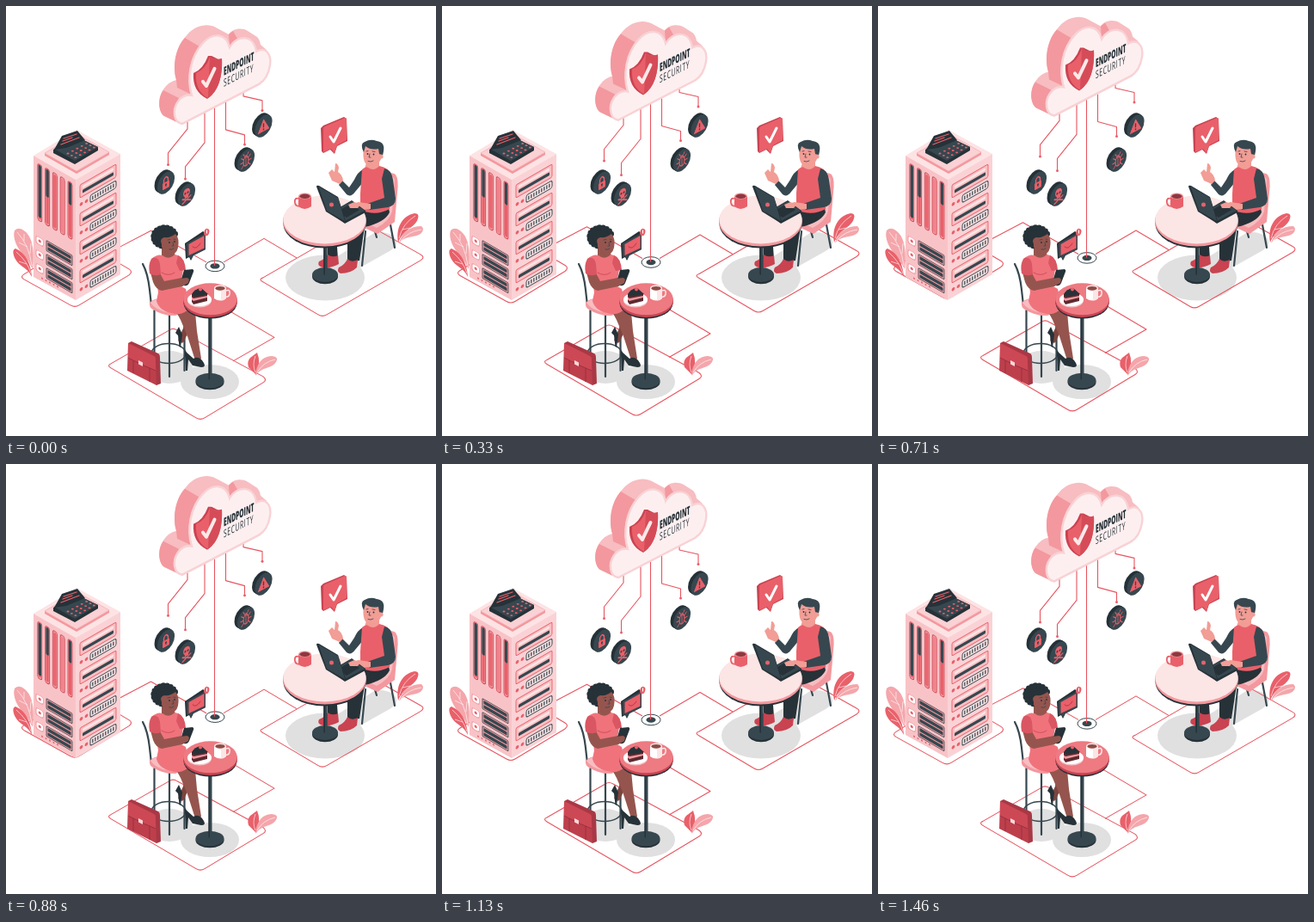
An HTML page for the animation above (1500 ms loop, 500 by 500 pixels).

```html
<!DOCTYPE html>
<html lang="en">
<head>
<meta charset="utf-8">
<title>Endpoint security</title>
<style>
html, body { margin: 0; width: 100%; height: 100%; overflow: hidden; background: #fff; }
svg { display: block; width: 100vw; height: 100vh; }
.line { fill: none; stroke: #e85560; stroke-width: 1.1; stroke-linejoin: round; }
.thin { fill: none; stroke: #37474f; stroke-width: .8; stroke-linecap: round; }
.leg { fill: none; stroke: #37474f; stroke-width: 2.2; stroke-linecap: round; stroke-linejoin: round; }
.limb { fill: none; stroke-linecap: round; stroke-linejoin: round; }
.dk { fill: #37474f; } .bk { fill: #263238; }
.red { fill: #e9606a; } .deep { fill: #c94351; } .rose { fill: #f3989e; }
.leaf { fill: #f4a6ab; } .pink { fill: #f7bdc1; } .pale { fill: #fce5e5; }
.dress { fill: #f0737c; }
.skin { fill: #f29d95; } .brown { fill: #95554e; }
.shade { fill: #e0e0e0; }
.vein { fill: none; stroke: #fff; stroke-width: .8; opacity: .75; }
text { font-family: "Open Sans", sans-serif; fill: #263238; }
</style>
</head>
<body>
<svg viewBox="0 0 500 500" xmlns="http://www.w3.org/2000/svg">
<g class="shade">
  <ellipse cx="371" cy="316" rx="46" ry="26.5"/>
  <path d="M384 292 L428 264 Q440 261 451 268 Q459 277 446 285 L412 304Z"/>
  <ellipse cx="190" cy="420" rx="27" ry="19"/>
  <ellipse cx="237" cy="437" rx="34" ry="20"/>
</g>

<g id="float">
  <g class="line">
    <path d="M34 303 L21 311 Q16 314 21 317 L75 347 Q80 350 85 347 L143 312 Q148 308 143 305 L126 295"/>
    <path d="M131 280 L168.500 260.300 L233 297"/>
    <path d="M253 297 L300 269.500 L338 292"/>
    <path d="M299 315 L408 252 Q413 249 418 252 L482 288 Q488 291 482 295 L373 358 Q368 361 363 358 L299 320 Q293 317 299 315Z"/>
    <path d="M240 342 L312 384.500 L264 412"/>
    <path d="M122 415 L190 376 Q194 373 199 376 L299 430 Q304 434 299 437 L231 478 Q226 481 221 478 L122 420 Q117 417 122 415Z"/>
    <path d="M211 126V142L188.500 170V183"/>
    <path d="M231 118V158L208.500 186V200"/>
    <path d="M255.500 102V143L277.500 149V160"/>
    <path d="M276 90V104L298 109V121"/>
  </g>
  <g class="red">
    <circle cx="188.500" cy="183.500" r="1.500"/><circle cx="208.500" cy="200" r="1.500"/>
    <circle cx="277.500" cy="160" r="1.500"/><circle cx="298" cy="120.500" r="1.500"/>
  </g>
  <ellipse cx="243" cy="301.500" rx="11" ry="6.300" fill="#fff" stroke="#37474f"/>
  <ellipse class="dk" cx="243" cy="301.500" rx="5.500" ry="3.200"/>
  <path class="line" d="M242.500 110V301"/>

  <path class="pink" d="M205 137 L184 127 C177 122 176 106 183 96 Q189 87 198 85 C193 67 198 46 211 32 C221 21 235 19 244 24 L259 32 C264 25 274 24 281 28 L292 35 Q295 38 296 44 L303 50 L296 90Z"/>
  <path class="rose" d="M205 137 L184 127 C177 122 176 106 183 97 L201 106 Q193 122 205 137Z M198 85 C193 67 198 46 208 36 L225 46 C213 60 210 84 216 102 L199 94Z M259 32 L264 28 L269 37 L260 46Z"/>
  <path fill="#fdeff0" stroke="#f9d2d5" stroke-width="2.400" d="M205 136 C195 135 193 120 200 110 Q207 101 216 103 C210 84 214 58 229 42 C241 29 256 31 260 47 C268 33 288 31 291 52 C302 46 309 55 307 68 C305 80 301 86 294 90Z"/>
  <path class="deep" d="M218 77 Q229 73 235 57 L239 57 L249 62 L240 102 L234 107 C222 101 217 91 218 77Z"/>
  <path class="red" d="M221 77 Q232 73 237 58 Q243 63 251 60 C252 81 247 98 235 106 C225 101 220 91 221 77Z"/>
  <path fill="#d54c58" d="M237 58 Q243 63 251 60 C252 81 247 98 235 106Z"/>
  <path class="limb" d="M229 87L233 92L242.500 72" stroke="#fce9e9" stroke-width="4"/>
  <text transform="matrix(.49 -.25 0 1 253 80)" font-size="13.600" font-weight="800">ENDPOINT</text>
  <text transform="matrix(.54 -.275 0 1 253 93)" font-size="12.400" letter-spacing="1.200">SECURITY</text>
</g>

<!-- leaves -->
<g>
  <path class="leaf" d="M31 306 C33 288 32 270 22 262 Q15 256 10 261 C7 269 13 282 20 289 Q27 297 31 306Z"/>
  <path class="vein" d="M30 302Q27 278 13 263M28 288L29 276M25 280L15 275M21 273L21 265"/>
  <path class="red" d="M30 315 C29 300 23 287 11 282 Q7 283 9 290 C13 303 25 303 30 315Z"/>
  <path class="vein" d="M29 311Q25 297 12 286M24 300L15 297"/>
  <path class="red" d="M456 275 C453 257 461 244 475 241 Q481 241 479 247 C476 258 462 259 456 275Z"/>
  <path class="vein" d="M457 270Q461 253 476 244M461 260L470 258"/>
  <path class="leaf" d="M457 276 C460 263 470 256 483 256 Q487 259 483 264 C477 270 464 266 457 276Z"/>
  <path class="vein" d="M459 273Q468 262 483 260"/>
  <path class="red" d="M291 429 L282 420 Q280 413 284 409 L292 403 Q297 415 291 429Z"/>
  <path class="vein" d="M290 426Q286 417 290 407"/>
  <path class="leaf" d="M290 430 C291 416 298 407 309 407 Q318 408 314 414 C308 423 299 418 290 430Z"/>
  <path class="vein" d="M292 426Q299 414 313 411"/>
</g>

<!-- server -->
<g>
  <path fill="#fde3e4" d="M32 174L82 144L133 172L81 202Z"/>
  <path fill="#f8c3c7" d="M32 174L81 202V342L32 315Z"/>
  <path fill="#fad2d5" d="M81 202L133 172V312L81 342Z"/>
  <path class="rose" d="M45 171L82 192L120 170V173L82 195L45 174Z"/>
  <path fill="#fad1d4" stroke="#f3a3a9" stroke-width=".6" d="M45 171L83 149L120 170L82 192Z"/>
  <path class="bk" d="M55 167L82 152L107 164V168L80 184L55 171Z"/>
  <path class="dk" d="M56 166L82 152L107 164L80 180Z"/>
  <path class="bk" d="M56 167L65 151L83 145L92 156L70 165Z"/>
  <path class="limb" d="M67 154L82 149M66 157L77 153M64 161L85 153" stroke="#e9606a" stroke-width="1.300"/>
  <g id="keys" class="red"></g>
  <g id="left" transform="matrix(1 .575 0 1 32 174)"></g>
  <g id="right" transform="matrix(1 -.577 0 1 81 202)"></g>
</g>

<!-- threat coins -->
<g id="coins"></g>

<!-- man -->
<g>
  <path class="leg" d="M418 262L414 302M429 262L431 269M446 249L452 281"/>
  <path class="rose" d="M440 200 Q447 191 453 196 Q457 202 455 217 L452 251 L432 265 L417 258 L437 243Z"/>
  <path class="pink" d="M443 202Q449 195 452 202L449 239Q446 250 431 258L420 253L438 242Z"/>
  <path class="bk" d="M444 230 L446 240 Q440 252 417 257 L411 296 L397 298 L397 265 L385 280 L386 294 L374 293 L374 263 Q385 245 414 236Z"/>
  <path class="deep" d="M374 289Q379 293 386 290L387 300Q379 305 368 304Q361 302 364 297Q371 294 374 289Z"/>
  <path class="deep" d="M397 294Q402 299 409 295L408 304Q401 311 389 311Q384 309 387 304Q394 301 397 294Z"/>
  <ellipse class="bk" cx="371" cy="314.500" rx="15" ry="8.800"/>
  <ellipse class="dk" cx="371" cy="312.500" rx="15" ry="8.500"/>
  <path class="dk" d="M369.300 278H373.700V312Q371.500 314 369.300 312Z"/>
  <path class="bk" d="M369.300 278H371V313L369.300 312Z"/>
  <ellipse class="bk" cx="370.500" cy="253" rx="48" ry="28.500"/>
  <ellipse class="rose" cx="370.500" cy="250.500" rx="48.500" ry="29"/>
  <ellipse class="pale" cx="370.500" cy="248.500" rx="48" ry="28"/>

  <path class="skin" d="M420 179L434 177L434 189Q426 196 417 189Z"/>
  <path class="dk limb" d="M415 190 Q409 193 405 202 L399 211 L391 203 L387 208 L396 219 Q401 223 406 216 L416 204Z"/>
  <path class="red" d="M414 190 Q419 186 421 188 Q428 193 434 186 Q444 188 448 195 L446 236 Q430 245 412 237 L412 218Z"/>
  <path class="dk" d="M440 189 Q448 190 450 202 L453 224 Q453 232 444 234 L423 237 L420 230 L440 223 L437 201Z"/>
  <path class="skin" d="M424 230L410 228L398 231L402 235L414 237L424 236Z"/>
  <path class="skin" d="M388 207 L379 203 L375 194 L379 190 L382 193 L383 183 Q386 183 387 188 L386 193 Q391 196 392 203Z"/>
  <path class="skin" d="M416 165 C414 178 417 186 424 186 Q433 186 436 178 L438 165 L432 161 H418Z"/>
  <path class="dk" d="M416 170 Q411 160 417 158 Q424 154 431 157 Q441 158 439 169 L438 174 L434 172 L433 166 Q424 168 418 163Z"/>
  <circle class="skin" cx="436" cy="175" r="2.600"/>
  <circle class="bk" cx="420.500" cy="172" r=".9"/><circle class="bk" cx="427.500" cy="172.500" r=".9"/>
  <path class="thin" d="M423 172L422 176L424 176M421 180.500Q424 182 427 180M419 169L421 168.500M426 169L429 169.500"/>

  <path class="bk" d="M378 240L402 226L418 238V240L394 253Z"/>
  <path class="dk" d="M380 239L402 227L417 238L394 250Z"/>
  <path class="bk" d="M385 239L401 230L411 237L396 246Z"/>
  <path class="bk" d="M361 210 Q361 208 364 209 L386 222 L395 250 L393 252 L372 239Z"/>
  <path class="dk" d="M363.500 210L386 223L394 250L373 238Z"/>
  <circle class="red" cx="378.500" cy="231" r="2.500"/>
  <path class="skin" d="M398 231L405 228L412 231L409 235L400 235Z"/>
  <path d="M341 224Q335 222 336 229Q337 234 343 232" fill="none" stroke="#e9606a" stroke-width="1.800"/>
  <path class="red" d="M340 221V233Q347 239 355 233V221Z"/>
  <ellipse class="rose" cx="347.500" cy="221" rx="7.500" ry="3.600"/><ellipse fill="#8c3840" cx="347.500" cy="221.300" rx="6" ry="2.700"/>
  <path class="deep" d="M366 142L369 139L393 129L396 131L397 157L385 163L382 172L377 167L369 171L367 169Z"/>
  <path class="red" d="M369 143Q369 141 371 140L394 130Q396 130 396 132V156L385 162L382 171L378 166L369 170Z"/>
  <path class="limb" d="M377 152L381 158L389 142" stroke="#fff" stroke-width="3"/>
</g>

<!-- woman -->
<g>
  <path class="leg" d="M159 300Q165 311 167 330L169 348M172.500 354V414M207.500 360V424M190 358V431"/>
  <ellipse class="thin" cx="189" cy="404" rx="20" ry="11.500" style="stroke-width:1.500"/>
  <path class="rose" d="M167 345Q172 339 187 340L207 349Q209 356 197 360Q184 361 171 353Q166 350 167 345Z"/>
  <path class="pink" d="M168 345Q176 338 190 342L204 350Q201 357 188 356Q174 354 168 345Z"/>
  <path class="limb" d="M200 352L212 370L204 388" stroke="#7d453f" stroke-width="7"/>
  <path class="bk" d="M201 373L205 382L203 397L201.500 396L200 383L197 380Z"/>
  <path class="brown" d="M196 352 Q211 345 220 356 L222 378 L227 410 L220 412 L211 384 L203 365Z"/>
  <path class="bk" d="M208 401 L218 410 Q225 406 230 415 Q233 420 227 420 L217 418 L212 411 L211 424 L209 424Z"/>
  <path class="dress" d="M175 320 Q193 318 209 329 L214 350 Q207 360 196 358 Q178 355 175 343 L177 333Z"/>
  <path class="brown" d="M181 281H195L197 292Q190 298 181 292Z"/>
  <path class="dress" d="M169 294 Q176 288 182 290 Q189 296 196 289 Q206 290 207 300 L203 325 Q190 331 176 324 L174 309Z"/>
  <path fill="#d95662" d="M200 290Q208 293 209 307L202 308L198 299Z"/>
  <path class="brown" d="M168 310L178 309L184 320L205 316L209 321L205 326L181 331Q174 329 171 321Z"/>
  <path fill="#d95662" d="M169 294Q177 290 179 300L180 312Q173 315 167 311Q165 301 169 294Z"/>
  <path class="thin" d="M181 310Q189 315 196 310" style="stroke:#cb4553"/>
  <path class="bk" d="M203 321L207 307L217 306Q219 307 218 309L213 322Q211 326 207 325Z"/>
  <path class="brown" d="M201 317L211 316L213 318L212 322L205 326L200 323Z"/>
  <g id="curls" class="bk"></g>
  <path class="brown" d="M181 277 Q178 271 184 269 Q191 270 197 265 Q202 270 200 281 Q198 289 191 289 Q184 288 181 280Z"/>
  <circle class="bk" cx="190" cy="275" r=".9"/><circle class="bk" cx="196" cy="274" r=".9"/>
  <path class="thin" d="M188 272L191 271.500M195 271L197 271.500M194 275L195 279L193 279M190 283Q193 284 195 282"/>

  <ellipse class="bk" cx="237" cy="437.500" rx="16.500" ry="8.800"/>
  <ellipse class="dk" cx="237" cy="435.500" rx="16.500" ry="8.800"/>
  <path class="dk" d="M235.500 358H239.500V434Q237.500 436 235.500 434Z"/>
  <path class="bk" d="M235.500 358H237V434.500L235.500 434Z"/>
  <ellipse class="bk" cx="237.500" cy="345.500" rx="31" ry="18"/>
  <ellipse class="deep" cx="237.500" cy="343" rx="31.500" ry="19"/>
  <ellipse fill="#ee7a82" cx="237.500" cy="340.800" rx="31.300" ry="18.500"/>
  <ellipse fill="#f4c3c6" cx="225" cy="342.500" rx="14" ry="8"/>
  <ellipse fill="#fff" cx="225" cy="341.300" rx="14" ry="7.800"/>
  <path fill="#5c2a31" d="M216 335L234 335V343L218 347L216 344Z"/>
  <path class="rose" d="M216 338.500L218 340L234 337V339L218 343L216 341.500Z"/>
  <path class="bk" d="M216 335Q219 329 227 328L235 335L218 338Z"/>
  <circle class="red" cx="226" cy="329.500" r="2"/>
  <path d="M256 331Q261 329 260 335Q259 339 255 338" fill="none" stroke="#fce5e5" stroke-width="1.600"/>
  <path fill="#fff" d="M242 328V340Q249 345 256 340V328Z"/>
  <path class="pale" d="M250 331L256 329V340Q253 343 250 342.500Z"/>
  <ellipse fill="#fce5e5" cx="249" cy="328" rx="7" ry="3.400"/><ellipse fill="#8c4d46" cx="249" cy="328.300" rx="5.500" ry="2.400"/>

  <path class="bk" d="M208 276L229 262L232 264V283L218 290L215 296L213 292L209 294Z"/>
  <path class="dk" d="M210 276L232 264V283L218 290L215 295L213 291L210 292Z"/>
  <path class="red" d="M212.500 277L230.500 267V281.500L212.500 290Z"/>
  <path class="limb" d="M217 280Q221 284 226 276" stroke="#b53a47" stroke-width="1"/>
  <ellipse class="red" cx="233.300" cy="263" rx="3" ry="4.300" transform="rotate(15 233 263)"/>
  <path d="M233.500 260.500V264.500" stroke="#fff" stroke-width="1"/>

  <path fill="#a93845" d="M142 392L146 390L177 404Q179 405 179 409L180 439L175 441Z"/>
  <path fill="#bd3f4c" d="M142 392L172 407Q174 408 174 411L175 441L141 424Z"/>
  <path fill="#cd4855" d="M142 392L172 407Q174 408 174 411V424L160 418L142 409Z"/>
  <path d="M142 409L160 418L174 424M148 412V427M167 421V437" fill="none" stroke="#98303d" stroke-width=".9"/>
  <path fill="#fbd7d9" d="M154 412L159 414.500V419L154 416.500Z"/>
</g>
</svg>
<script>
const $ = id => document.getElementById(id);
const rect = (x, y, w, h, fill, rx = 0, more = "") =>
  `<rect x="${x}" y="${y}" width="${w}" height="${h}" rx="${rx}" fill="${fill}" ${more}/>`;
const dot = (x, y, r, fill) => `<circle cx="${x}" cy="${y}" r="${r}" fill="${fill}"/>`;
const times = (n, fn) => Array.from({ length: n }, (_, i) => fn(i)).join("");
const dark = "#37474f", red = "#e9606a", rose = "#f3989e", deep = "#cb4553";

function leftFace() {
  const fills = [.95, .5, 0, 0, .4];
  const bars = fills.map((f, i) => {
    const x = 4.8 + i * 8.8;
    return rect(x, 6, 5, 66, rose, 2.5, `stroke="${deep}" stroke-width=".8"`) +
      rect(x + 1, 8, 3, 62, i == 3 ? "#f0838b" : red, 1.5) +
      (f ? rect(x + .8, 7, 3.4, 64 * f, dark, 1.5) : "");
  }).join("");
  const vents = times(3, i => {
    const y = 90 + i * 16;
    return rect(2.5, y + 1, 9, 9, rose, 2) + rect(3.5, y + 1.5, 7.5, 7.5, "#fff", 2) +
      dot(7.2, y + 5.3, 1.6, red) +
      rect(15, y, 30, 12, rose, 1, `stroke="${dark}" stroke-width=".8"`) +
      rect(16.5, y + 1.5, 27, 3.8, dark, .6) + rect(16.5, y + 6.7, 27, 3.8, dark, .6);
  });
  return bars + vents + times(5, i => dot(10 + i * 4.5, 137 - i * .2, 1, red));
}

function rightFace() {
  return times(4, i => {
    const y = 9 + i * 33;
    return rect(5, y, 42, 15, "#f9bfc3", 1.5, `stroke="${red}" stroke-width=".9"`) +
      rect(8, y + 2.5, 36, 3, "#fce5e5", 1) + rect(8, y + 7.5, 36, 3.8, dark, 1) +
      dot(6.5, y + 23, 1.9, red) + dot(12.5, y + 23, 1.9, red) +
      rect(17, y + 19, 30, 8.5, "#fce5e5", 2, `stroke="${dark}" stroke-width="1"`) +
      times(9, k => rect(19.2 + k * 3, y + 21, 1.3, 4.5, dark));
  });
}

const stroke = (d, w = 1.3) => `<path d="${d}" fill="none" stroke="${red}" stroke-width="${w}" stroke-linecap="round"/>`;
const lock = rect(-4.5, -1, 9, 7.5, red, 1) + stroke("M-2.8 -1V-4Q0 -9 2.8 -4V-1", 1.6) +
  dot(0, 2, 1.2, dark) + rect(-.5, 2, 1, 2.5, dark);
const skull = dot(0, -2.5, 4.5, red) + rect(-2.5, 0, 5, 3.6, red, 1) + dot(-1.8, -2, 1.2, dark) +
  dot(1.8, -2, 1.2, dark) + stroke("M-5.5 3L5.5 8M5.5 3L-5.5 8", 1.6);
const bug = `<ellipse cy="1" rx="3.400" ry="5" fill="none" stroke="${red}" stroke-width="1.200"/>` +
  stroke("M0 -3V6M-2 -4Q0 -7 2 -4M-2 -6L-3.500 -8M2 -6L3.500 -8M-3.400 1H-7M3.400 1H7M-3 -2L-6 -4.500M3 -2L6 -4.500M-3 4L-6 7M3 4L6 7", 1);
const alarm = `<path d="M0 -7L7 5.500H-7Z" fill="${red}" stroke="${red}" stroke-linejoin="round"/>` +
  rect(-.8, -3, 1.6, 4.8, dark, .6) + dot(0, 3.7, 1, dark);

// Isometric disc with its thickness to the left
const coin = (x, y, glyph) =>
  `<g transform="matrix(.84 -.46 0 1 ${x} ${y})">` +
  times(4, i => dot(i - 4, (i - 4) * .98, 12, "#263238")) + dot(0, 0, 12, dark) +
  `<g transform="scale(1.04)">${glyph}</g></g>`;

$("left").innerHTML = leftFace();
$("right").innerHTML = rightFace();
$("keys").innerHTML = times(15, i => {
  const a = i % 5, b = Math.floor(i / 5);
  return `<ellipse cx="${72 + a * 5.4 + b * 4.4}" cy="${171.5 - a * 2.9 + b * 2.3}" rx="1.500" ry=".9"/>`;
});
$("curls").innerHTML = dot(184, 268, 13) + times(13, i => {
  const a = Math.PI * (.6 + i * .108);
  return dot(184.5 + 13 * Math.cos(a), 268.5 + 11 * Math.sin(a), 3.2);
});
$("coins").innerHTML = coin(186, 205.5, lock) + coin(210, 219.5, skull) +
  coin(279, 179.5, bug) + coin(299.5, 139.5, alarm);

// Linear rise of ten units and back
const loop = 1500, lift = 10, rest = .9;
const float = $("float");
const start = performance.now();
function draw(now) {
  const p = Math.max(0, now - start) % loop / loop;
  const y = rest - lift * (1 - Math.abs(1 - 2 * p));
  float.setAttribute("transform", `translate(0 ${y.toFixed(3)})`);
  requestAnimationFrame(draw);
}
draw(start);
</script>
</body>
</html>
```
